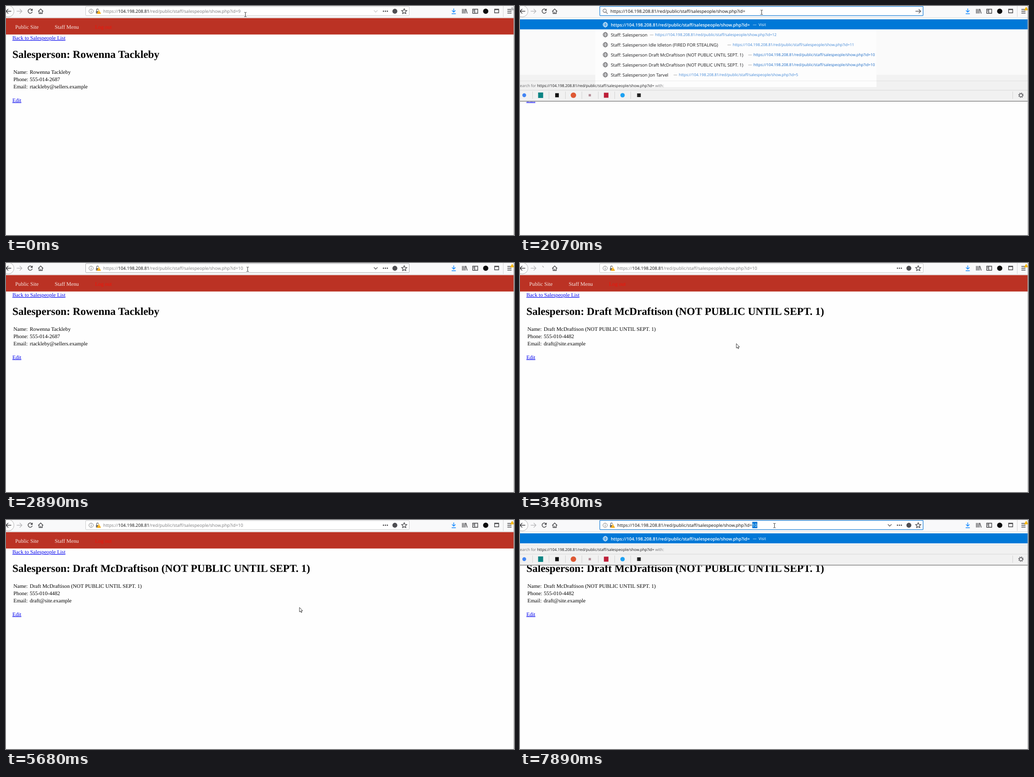
Write an HTML page that moves like this. It is 1113 by 503 pixels and loops after 8000 ms.

```html
<!DOCTYPE html>
<html lang="en">
<head>
<meta charset="utf-8">
<title>Staff: Salesperson</title>
<style>
html, body { margin: 0; width: 100%; height: 100%; overflow: hidden; background: #fefefe; }
svg { display: block; width: 1113px; height: 503px; }
text { text-rendering: geometricPrecision; white-space: pre; }
.ui { font: 9.64px "Open Sans", "Noto Sans", sans-serif; }
.small { font-size: 8.37px; }
.medium { font-weight: 500; }
.semi { font-weight: 600; }
.page { font: 11.73px "Liberation Serif", "Times New Roman", serif; }
.page .title { font-size: 23.47px; font-weight: bold; }
.link { fill: #00e; text-decoration: underline; }
.line { fill: none; stroke: #3f3f42; stroke-width: 1.4; }
</style>
</head>
<body>
<svg id="stage" viewBox="0 0 1113 503"></svg>
<script>
const LOOP = 8000;
const HOST = '104.198.208.81';
const PATH = '/red/public/staff/salespeople/show.php?id=';
const BLUE = '#0078d7';
const HIDDEN = 'Draft McDraftison (NOT PUBLIC UNTIL SEPT. 1)';
const PEOPLE = {
  9: ['Rowenna Tackleby', '555-014-2687', 'rtackleby@sellers.example'],
  10: [HIDDEN, '555-010-4482', 'draft@site.example'],
};
// title, link position, id
const HISTORY = [
  ['', 296, 12],
  [' Idle Idleton (FIRED FOR STEALING)', 466, 11],
  [' ' + HIDDEN, 511.5, 10],
  [' ' + HIDDEN, 511.5, 10],
  [' Jon Tarvel', 348, 5],
];

// Each step changes part of the state and holds until the next one.
// bar: idle | hover | focus | typing; sel: '' | all | id; list: '' | short | long
const STEPS = [
  [0, { person: 9, id: '9', query: '', bar: 'idle', sel: '', list: '', caret: 0, load: 'reload',
        chevron: .3, badge: '#b5b5b8', mouse: [524.5, 18.5, 'beam'] }],
  [120, { bar: 'hover', chevron: 1, mouse: [529.5, 13.5, 'beam'] }],
  [570, { bar: 'focus', sel: 'all', badge: '#f7b500' }],
  [1250, { sel: '', caret: 514 }],
  [1680, { caret: 0 }],
  [1940, { list: 'short' }],
  [2070, { bar: 'typing', id: '', list: 'long' }],
  [2200, { id: '1', query: '1' }],
  [2350, { id: '10', query: '10', caret: 505 }],
  [2620, { caret: 0 }],
  [2760, { list: '', bar: 'focus' }],
  [2890, { bar: 'hover' }],
  [3080, { load: 'stop' }],
  [3230, { person: 10, bar: 'idle', chevron: 0, load: 'turn', mouse: [510, 60, 'arrow'] }],
  [3350, { mouse: [488, 126, 'arrow'] }],
  [3480, { mouse: [474, 177, 'arrow'] }],
  [3610, { mouse: [492, 150, 'arrow'] }],
  [3730, { mouse: [508, 70, 'arrow'] }],
  [3880, { load: 'reload', bar: 'hover', chevron: 1, mouse: [514.5, 13.5, 'beam'] }],
  [4000, { mouse: [517.5, 12.5, 'beam'] }],
  [4120, { bar: 'idle', chevron: 0, mouse: [490, 80, 'arrow'] }],
  [4250, { mouse: [446, 140, 'arrow'] }],
  [4370, { mouse: [416.5, 104, 'beam'] }],
  [4670, { mouse: [470.5, 104, 'beam'] }],
  [4790, { mouse: [530.5, 104, 'beam'] }],
  [4910, { mouse: [582.5, 104, 'beam'] }],
  [5030, { mouse: [613.5, 104, 'beam'] }],
  [5170, { mouse: [616.5, 103, 'beam'] }],
  [5430, { mouse: [530.5, 104, 'beam'] }],
  [5550, { mouse: [423.5, 106, 'beam'] }],
  [5680, { mouse: [643, 192, 'arrow'] }],
  [5940, { mouse: [628, 158, 'arrow'] }],
  [6060, { mouse: [598, 82, 'arrow'] }],
  [6190, { mouse: [572, 34, 'arrow'] }],
  [6310, { bar: 'hover', chevron: 1, mouse: [560.5, 13.5, 'beam'] }],
  [6430, { mouse: [557.5, 12, 'beam'] }],
  [6690, { bar: 'focus', sel: 'all' }],
  [7220, { sel: 'id' }],
  [7890, { list: 'short', query: '' }],
];

const rect = (x, y, w, h, fill, more = '') =>
  `<rect x="${x}" y="${y}" width="${w}" height="${h}" fill="${fill}" ${more}/>`;
const circle = (x, y, r, fill, more = '') =>
  `<circle cx="${x}" cy="${y}" r="${r}" fill="${fill}" ${more}/>`;
const text = (x, y, str, cls = '', fill = '#000', more = '') =>
  `<text x="${x}" y="${y}" class="${cls}" fill="${fill}" ${more}>${str}</text>`;
const span = (str, fill) => `<tspan fill="${fill}">${str}</tspan>`;
const line = (d, color = '#3f3f42', more = '') =>
  `<path class="line" d="${d}" style="stroke:${color}" ${more}/>`;
const shape = (d, fill) => `<path d="${d}" fill="${fill}"/>`;
const url = id => `https://${HOST}${PATH}${id}`;

function page(s) {
  const [name, phone, email] = PEOPLE[s.person];
  const row = (y, label, value) => text(16.3, y, label) + text(52, y, value);
  return `<g class="page">${rect(0, 26.4, 1113, 36.2, '#bb3224')}
    ${text(20.3, 50, 'Public Site', '', '#f8ece8')}${text(106.8, 50, 'Staff Menu', '', '#f8ece8')}
    ${text(195, 50, 'Log out', '', '#f21208')}
    ${text(14, 74, 'Back to Salespeople List', 'link')}
    ${text(14, 114, 'Salesperson: ' + name, 'title')}
    ${row(148.6, 'Name:', name)}${row(165, 'Phone:', phone)}${row(181.4, 'Email:', email)}
    ${text(14, 210.8, 'Edit', 'link')}</g>`;
}

function loadIcon(mode) {
  if (mode === 'stop') return line('M49 7.5l8 8m0-8l-8 8');
  if (mode === 'turn') return line('M49 6.5l3 3', '#aaa');
  return line('M57 8.6A4.7 4.7 0 1 0 57.6 12.6') + shape('M58.4 5.5v5h-5z', '#3f3f42');
}

function toolbar(s) {
  return rect(0, 0, 1113, 26.4, '#f9f9fa') + rect(0, 25, 1113, 1, '#dcdcdc')
    + circle(5, 11.5, 12.5, '#fdfdfd', 'stroke="#b4b4b4"')
    + line('M11.5 11.5H0m5-5l-5 5 5 5')
    + line('M23.5 11.5H35m-5-5l5 5-5 5', '#b9b9bb')
    + loadIcon(s.load)
    + line('M70.5 12L76 6.5l5.5 5.5M72.5 11v5.5h7V11M76 16.5V13')
    + line('M981 5.5v8m-3.8-3.8l3.8 3.8 3.8-3.8M976.5 17h9', '#0a84ff')
    + line('M1000 6.5v10m3-10v10m3-10v10m1.5-10l3 10')
    + line('M1022.5 7h11v9h-11zM1027 7v9M1024 9.5h1.5m-1.5 2h1.5')
    + circle(1051, 11.5, 5.7, '#0c0c0d')
    + line('M1070.5 7h9v8h-9zm0 1h9')
    + rect(1089, 0, 1, 24, '#d4d4d6')
    + line('M1098.5 7.5h9m-9 4h9m-9 4h9')
    + shape('M1109 1.5l4.5 8h-9z', s.badge);
}

function addressBar(s) {
  const typing = s.bar === 'typing', focus = typing || s.bar === 'focus';
  const x = typing ? 198 : 213;
  const all = s.sel === 'all';
  const gray = all ? '#fff' : focus ? '#0c0c0d' : '#7c7c7e';
  const dark = all ? '#fff' : '#0c0c0d';
  let out = focus
    ? rect(174.8, .8, 708.4, 20.4, '#fff', 'rx="1.5" stroke="#3d92dc" stroke-width="1.5"')
    : rect(174.5, 1.3, 709, 19.7, '#fff', `rx="1.5" stroke="${s.bar === 'hover' ? '#a9a9ab' : '#cacacb'}"`);

  if (all) out += rect(213, 4, s.id.length > 1 ? 307 : 302, 14, BLUE);
  if (s.sel === 'id') out += rect(509, 4, 11, 14, BLUE);
  out += text(x, 15, span('https://', gray) + span(HOST, dark) + span(PATH, gray)
    + span(s.id, s.sel ? '#fff' : gray), 'ui');
  if (s.caret) out += rect(s.caret, 4, 1, 14, '#000');

  if (typing) {
    return out + circle(185.5, 10.3, 3.7, 'none', 'stroke="#77777a" stroke-width="1.3"')
      + line('M188 13l4 4', '#77777a') + line('M866.5 11.5H878m-4.5-4.5l4.5 4.5-4.5 4.5', '#55555a');
  }
  return out + circle(186.5, 11.5, 4.7, 'none', 'stroke="#737376"')
    + rect(186, 8.5, 1.1, 1.2, '#737376') + rect(186, 10.7, 1.1, 3.5, '#737376')
    + line('M198.5 11V8.5a2 2 0 0 1 4 0', '#737376') + rect(197, 11, 7, 5.5, '#737376')
    + shape('M203.5 8.5l4.5 8.5h-9z', '#f5a800') + rect(203, 11.5, 1, 2.8, '#fff')
    + line('M806 9.5l4 4 4-4', '#5a5a5d', `opacity="${s.chevron}"`)
    + [827, 831.3, 835.6].map(c => circle(c, 11.5, 1.4, '#4a4a4d')).join('')
    + circle(852, 11.5, 5.4, '#4f4f53')
    + line('M872.5 6l1.7 3.6 4 .5-2.9 2.7.8 3.9-3.6-1.9-3.6 1.9.8-3.9-2.9-2.7 4-.5z', '#4a4a4d');
}

function globe(y, color) {
  return `<g fill="none" stroke="${color}"><circle cx="187" cy="${y}" r="5"/>
    <ellipse cx="187" cy="${y}" rx="2.3" ry="5"/><path d="M182 ${y}h10M183 ${y - 2.7}h8M183 ${y + 2.7}h8" stroke-width=".8"/></g>`;
}

function engines(y) {
  const marks = [
    x => circle(x, y, 4.2, '#4285f4'),
    x => rect(x - 5.5, y - 6, 11, 12, '#0c8484'),
    x => rect(x - 4, y - 4.5, 8, 9, '#111'),
    x => circle(x, y, 6, '#de5833'),
    x => rect(x - 2.5, y - 2.5, 5, 5, '#b08a93'),
    x => rect(x - 5, y - 5.5, 10, 11, '#bd1f38'),
    x => circle(x, y, 4.8, '#1da1f2'),
    x => rect(x - 4, y - 4, 8, 8, '#222'),
  ];
  const divider = x => rect(x, y - 8, 1, 16, '#d2d2d2');
  const gear = circle(1097.5, y, 3.3, 'none', 'stroke="#66666a" stroke-width="1.4"')
    + circle(1097.5, y, 4.8, 'none', 'stroke="#66666a" stroke-width="2" stroke-dasharray="1.9 1.87"');
  return marks.map((draw, i) => draw(9.3 + i * 35.9)
    + (i < 7 ? divider(27 + Math.round(i * 35.9)) : '')).join('') + divider(1079) + gear;
}

function historyRow([title, x, id], i) {
  const y = 63 + i * 22, match = id === 10;
  return globe(y, '#5c5c60') + text(199, y + 3.6, 'Staff: Salesperson' + title, '', '#18181a')
    + text(x - 3.5, y + 3.4, '—', 'small', '#777', 'text-anchor="end"')
    + text(x, y + 3.4, url(id), match ? 'small medium' : 'small', match ? '#1667c4' : '#3f86d6');
}

function dropdown(s) {
  if (!s.list) return '';
  const long = s.list === 'long', top = long ? 164 : 54;
  const visit = s.query.length * 5.6 + 510;
  let out = rect(0, 26, 1113, top - 26, '#fafafa');
  if (long) out += rect(0, 151, 1113, 13, '#f2f2f2');
  out += rect(0, top, 1113, 45, '#f1f1f1') + rect(0, top, 1113, 1, '#dfdfdf');
  if (long) {
    out += rect(165, 52, 616, 126, '#fdfdfd') + rect(165, 164, 616, 1, '#ececec')
      + `<g clip-path="url(#rows)">${HISTORY.map(historyRow).join('')}</g>`;
  }
  out += rect(0, 29.3, 1113, 22, BLUE) + globe(41, '#fff')
    + text(199, 44.6, url(s.query), 'semi', '#fff')
    + text(visit, 44.4, '—  Visit', 'small', '#fff');
  out += text(-4.5, top + 13.7, span('Search for ', '#737376') + span(url(s.query), '#18181a')
    + span(' with:', '#737376'), 'small');
  out += rect(0, top + 20.5, 1113, 1, '#d6d6d6') + engines(top + 32)
    + rect(0, top + 44, 1113, 1, '#b4b4b4') + rect(0, top + 45, 1113, 1, '#8a8a8a');
  return `<g class="ui">${out}</g>`;
}

function pointer([x, y, kind]) {
  const beam = kind === 'beam';
  const d = beam
    ? 'M-2.5-4.5h2l.5.5.5-.5h2M0-4v8.5M-2.5 5h2l.5-.5.5.5h2'
    : 'M0 0v10l2.3-2 1.5 3.4 1.6-.7-1.5-3.3h3z';
  return `<path transform="translate(${x} ${y})" d="${d}" fill="${beam ? 'none' : '#fff'}" stroke="#222" stroke-width=".9"/>`;
}

const stage = document.getElementById('stage');
const clip = '<clipPath id="rows"><path d="M165 52h616v126H165z"/></clipPath>';
const begin = performance.now();
let shown = 0;

function tick() {
  const t = (performance.now() - begin) % LOOP;
  const count = STEPS.filter(([start]) => start <= t).length;
  if (count !== shown) {
    shown = count;
    const s = Object.assign({}, ...STEPS.slice(0, count).map(step => step[1]));
    stage.innerHTML = clip + page(s) + toolbar(s) + addressBar(s) + dropdown(s)
      + rect(1112, 0, 1, 503, '#b5b5b5') + pointer(s.mouse);
  }
  requestAnimationFrame(tick);
}
tick();
</script>
</body>
</html>
```
